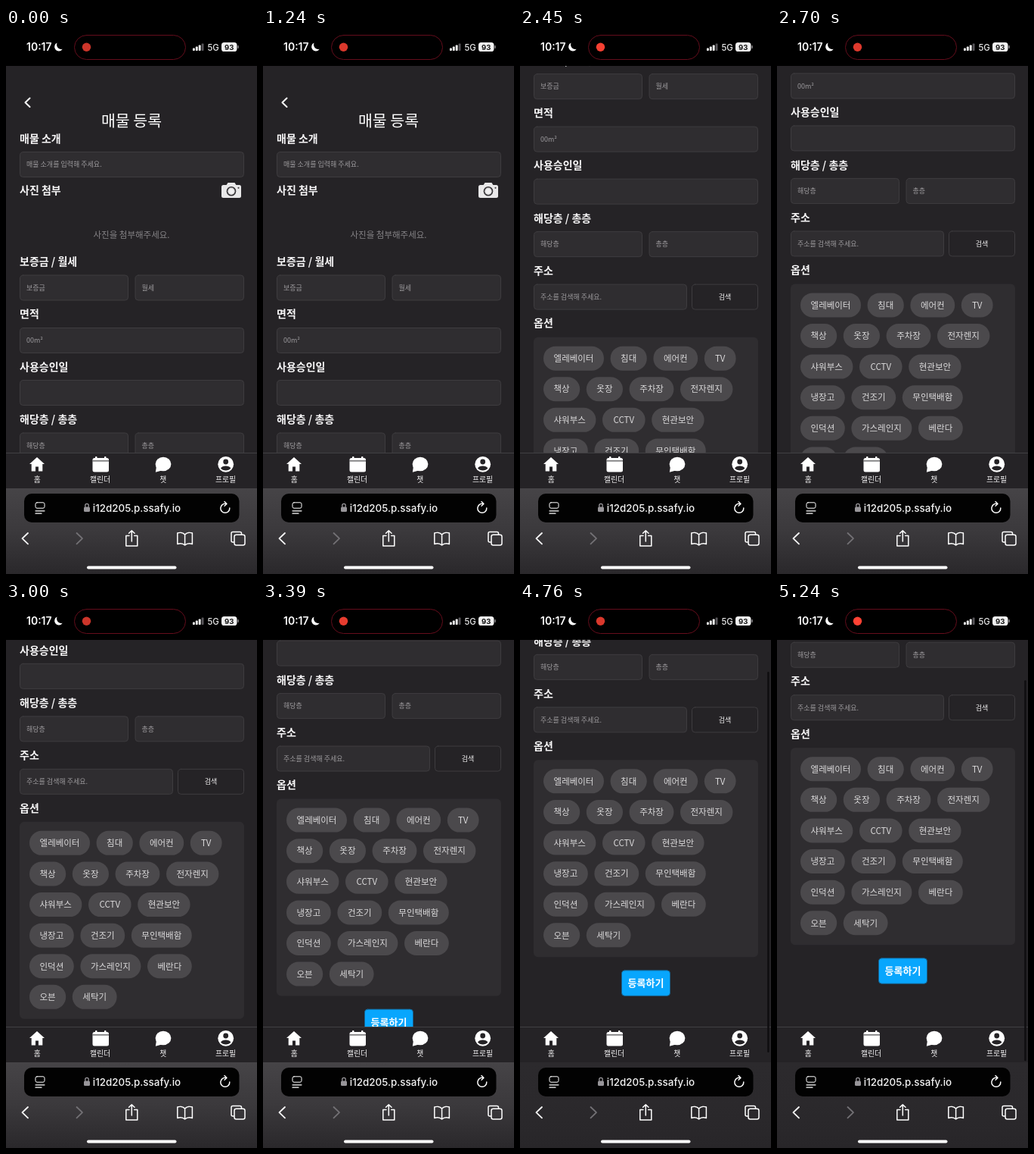
Animation of 332x720 px, one loop 5.27 s. Source, as an HTML page with a canvas:

```html
<!DOCTYPE html>
<html lang="ko">
<head>
<meta charset="utf-8">
<style>
  html, body { margin: 0; width: 100%; height: 100%; overflow: hidden; background: #000; }
  canvas { display: block; width: 332px; height: 720px; }
</style>
</head>
<body>
<canvas id="stage"></canvas>
<script>
const W = 332, H = 720, LOOP = 5270;
const KOREAN = '"Noto Sans CJK KR", "Noto Sans CJK", sans-serif';
const LATIN = 'Inter, sans-serif';
const BG = '#252326', FIELD = '#2f2d30', EDGE = '#3e3c3f', CHIP = '#4b494c', HINT = '#9c9a9d', WHITE = '#fff';

const canvas = document.getElementById('stage');
const c = canvas.getContext('2d');
const scale = window.devicePixelRatio || 1;
canvas.width = W * scale;
canvas.height = H * scale;

// ---- drawing helpers ----
function text(str, x, cy, size, color, { weight = 500, align = 'left', font = KOREAN } = {}) {
  c.font = `${weight} ${size}px ${font}`;
  c.textAlign = align;
  c.fillStyle = color;
  c.fillText(str, x, cy + size * 0.37);
}

function box(x, y, w, h, r, fill, stroke) {
  c.beginPath();
  c.roundRect(x, y, w, h, r);
  if (fill) { c.fillStyle = fill; c.fill(); }
  if (stroke) { c.strokeStyle = stroke; c.lineWidth = 1; c.stroke(); }
}

function disc(x, y, r, color) {
  c.beginPath();
  c.arc(x, y, r, 0, Math.PI * 2);
  c.fillStyle = color;
  c.fill();
}

function shape(d, color) {
  c.fillStyle = color;
  c.fill(new Path2D(d));
}

function line(d, color, width = 1.6) {
  c.strokeStyle = color;
  c.lineWidth = width;
  c.lineCap = c.lineJoin = 'round';
  c.stroke(new Path2D(d));
}

const clamp01 = v => Math.min(1, Math.max(0, v));

// ---- motion ----
const DRAG = [[1540, 0, 0], [2060, 120.5, 0.3], [2300, 201, 0.496]];
const PAGE_DRAG = [[4300, 420, 0], [4600, 455, 0.073]];
const DECAY = 0.0021, LIST_END = 420;

// Cubic through [time, position, velocity] knots.
function glide(knots, t) {
  const i = knots.findIndex((k, n) => n > 0 && t <= k[0]);
  const [t0, p0, v0] = knots[i - 1], [t1, p1, v1] = knots[i];
  const d = t1 - t0, u = (t - t0) / d, w = 1 - u;
  return w * w * ((1 + 2 * u) * p0 + u * d * v0) + u * u * ((3 - 2 * u) * p1 - w * d * v1);
}

function scrollAt(t) {
  if (t < 1540) return 0;
  if (t < 2300) return glide(DRAG, t);
  if (t < 4300) return Math.min(LIST_END, 437.3 - 172.3 * Math.exp(-DECAY * (t - 2450)));
  if (t < 4600) return glide(PAGE_DRAG, t);
  return 490 - 25.4 * Math.exp(-DECAY * (t - 4760));
}

// ---- scrolling form ----
const LABELS = [['매물 소개', 146], ['사진 첨부', 214], ['보증금 / 월세', 308], ['면적', 377],
  ['사용승인일', 446.5], ['해당층 / 총층', 516], ['주소', 585], ['옵션', 654.5]];
const FIELDS = [['매물 소개를 입력해 주세요.', 18, 163, 297], ['보증금', 18, 325.5, 144], ['월세', 170.5, 325.5, 144.5],
  ['00m²', 18, 395, 297], ['', 18, 464, 297], ['해당층', 18, 533.5, 144], ['총층', 170.5, 533.5, 144.5],
  ['주소를 검색해 주세요.', 18, 603, 203]];
const OPTIONS = ['엘레베이터 침대 에어컨 TV', '책상 옷장 주차장 전자렌지', '샤워부스 CCTV 현관보안',
  '냉장고 건조기 무인택배함', '인덕션 가스레인지 베란다', '오븐 세탁기'];

function drawCamera(x, y) {
  c.save();
  c.translate(x, y);
  shape('M-7 -6 L-4.5 -10 H4.5 L7 -6 Z', '#e9e8e9');
  box(-13, -7, 26, 17, 2.5, '#e9e8e9');
  disc(0, 1.3, 6.3, '#343235');
  disc(0, 1.3, 4.7, '#dcdbdc');
  disc(0, 1.3, 3.2, '#f1f0f1');
  disc(9.5, -3.2, 1.1, '#454346');
  c.restore();
}

function drawOptions() {
  box(18, 673, 297, 260, 6, FIELD);
  OPTIONS.forEach((row, r) => {
    const cy = 701 + r * 40.6;
    let x = 31;
    for (const name of row.split(' ')) {
      const w = name.length * (/[A-Z]/.test(name) ? 7.4 : 10.6) + 27;
      box(x, cy - 16, w, 32, 16, CHIP);
      text(name, x + w / 2, cy, 11.5, '#dad9da', { align: 'center' });
      x += w + 8.6;
    }
  });
}

function drawForm(scroll) {
  c.save();
  c.beginPath();
  c.rect(0, 50, W, 510);
  c.clip();
  c.translate(0, -scroll);
  line('M31.5 92.5 L25.5 98.3 L31.5 104', WHITE, 2);
  text('매물 등록', 166, 122, 20.5, WHITE, { align: 'center' });
  for (const [label, y] of LABELS) text(label, 18, y, 14, '#f7f6f7', { weight: 700 });
  for (const [hint, x, y, w] of FIELDS) {
    box(x + 0.5, y + 0.5, w - 1, 33, 4, FIELD, EDGE);
    text(hint, x + 9, y + 17, 9, HINT);
  }
  drawCamera(298, 214);
  text('사진을 첨부해주세요.', 166, 273, 11.5, '#858386', { align: 'center' });
  box(227.5, 603.5, 87, 33, 4, BG, EDGE);
  text('검색', 271, 620, 9, '#efeeef', { align: 'center' });
  drawOptions();
  box(134.5, 950.5, 64, 33.5, 4, '#08a6fd', '#15628f');
  text('등록하기', 166.5, 967.3, 13, WHITE, { weight: 700, align: 'center' });
  c.restore();
}

// ---- fixed bars ----
function drawStatusBar(t) {
  c.fillStyle = '#000';
  c.fillRect(0, 0, W, 50);
  text('10:17', 27, 25, 14, WHITE, { weight: 600, font: LATIN });
  shape('M67.6 19.6 A5.7 5.7 0 1 0 74.7 27.8 A6 6 0 0 1 67.6 19.6 Z', WHITE);
  box(90.5, 9.5, 147, 32, 16, '#000', '#650d1c');
  const glow = 0.9 - 0.1 * Math.cos(t / 1500 * Math.PI * 2);
  disc(106.5, 25.3, 5.7, `rgb(${255 * glow}, ${66 * glow}, ${52 * glow})`);
  for (let i = 0; i < 4; i++) {
    const h = 3.5 + i * 2;
    box(247 + i * 3.9, 30 - h, 2.8, h, 0.8, i < 3 ? WHITE : '#58565a');
  }
  text('5G', 266.5, 25.3, 11.4, '#e8e8e8', { font: LATIN });
  box(285, 19, 20.5, 12, 3.6, '#f2f2f2');
  box(306.3, 23, 1.5, 4, 0.7, '#8b898c');
  text('93', 295.2, 25.1, 9.6, '#161616', { weight: 700, align: 'center', font: LATIN });
}

function drawTabs() {
  c.fillStyle = BG;
  c.fillRect(0, 560, W, 47);
  c.fillStyle = '#414043';
  c.fillRect(0, 560, W, 1);
  shape('M41 566 L51 575 H48.3 V584.5 H43 V578.5 H39 V584.5 H33.7 V575 H31 Z', WHITE);
  box(114.5, 567, 21.5, 18.5, 2.5, WHITE);
  box(118, 565, 2.5, 4, 1, WHITE);
  box(130, 565, 2.5, 4, 1, WHITE);
  c.fillStyle = BG;
  c.fillRect(114.5, 570.4, 21.5, 1);
  c.beginPath();
  c.ellipse(208, 575, 10.4, 9.2, 0, 0, Math.PI * 2);
  c.fillStyle = WHITE;
  c.fill();
  shape('M199 578 L197.8 585.8 L206 583.5 Z', WHITE);
  disc(290.7, 575.3, 10.4, WHITE);
  disc(290.7, 572, 3.4, BG);
  shape('M284 580.4 C286 576.4 295.4 576.4 297.4 580.4 C294.5 584.4 286.9 584.4 284 580.4 Z', BG);
  [['홈', 41.3], ['캘린더', 124.6], ['챗', 207.8], ['프로필', 290.6]].forEach(([name, x]) =>
    text(name, x, 595.5, 9.8, '#f3f2f3', { align: 'center' }));
}

function drawBrowserBar(scroll) {
  // The translucent bar darkens as the page slides beneath it.
  const tint = clamp01((scroll - LIST_END) / 40);
  const grey = (from, to) => {
    const v = from + (to - from) * tint;
    return `rgb(${v}, ${v - 2}, ${v + 1})`;
  };
  const shade = c.createLinearGradient(0, 607, 0, H);
  shade.addColorStop(0, grey(70, 44));
  shade.addColorStop(0.5, grey(59, 43));
  shade.addColorStop(1, grey(42, 40));
  c.fillStyle = shade;
  c.fillRect(0, 607, W, H - 607);
  box(24, 614, 284.5, 38, 10, '#020202');

  box(39, 625.8, 12, 7.4, 2, null, WHITE);
  line('M39 636.8 H51 M39 640.2 H47', WHITE, 1.2);
  box(103, 631.5, 8, 6.5, 1.5, '#98969a');
  line('M104.8 631.5 V629.5 A2.2 2.2 0 0 1 109.2 629.5 V631.5', '#98969a', 1.3);
  text('i12d205.p.ssafy.io', 173, 633, 13.4, '#f5f5f5', { align: 'center', font: LATIN });
  line('M295.8 633 A6 6 0 1 1 290.4 627.4', WHITE, 1.5);
  line('M289 624.6 L292 627.4 L289 630.2', WHITE, 1.4);

  line('M29 666 L21.5 673.2 L29 680.4', WHITE, 1.8);
  line('M93.5 666 L101 673.2 L93.5 680.4', '#737175', 1.8);
  line('M163 669.5 H158.8 V683 H173.8 V669.5 H169.6 M166.3 677 V662.8 M162.6 666.3 L166.3 662.7 L170 666.3', WHITE, 1.5);
  line('M236.6 668 C234 665 229.5 665 226.8 666 V680.5 C230 679.3 234 679.5 236.6 682 C239.2 679.5 243.2 679.3 246.4 680.5 V666 C243.7 665 239.2 665 236.6 668 V681.5', WHITE, 1.5);
  line('M301.5 678 H300 Q298 678 298 676 V666.5 Q298 664.5 300 664.5 H309.5 Q311.5 664.5 311.5 666.5 V668', WHITE, 1.5);
  c.beginPath();
  c.roundRect(302, 668.3, 14, 13.7, 2.5);
  c.stroke();
  box(107, 709.5, 118.5, 4, 2, WHITE);
}

function drawScrollbar(t, scroll) {
  const fade = clamp01((t - 4320) / 120);
  if (!fade) return;
  c.save();
  c.beginPath();
  c.rect(0, 50, W, 557);
  c.clip();
  c.globalAlpha = fade;
  box(327.2, 92 + (scroll - 464.6) * 0.69, 2.4, 502, 1.2, '#0e0d0f');
  c.restore();
}

function frame() {
  const t = performance.now() % LOOP;
  const scroll = scrollAt(t);
  c.setTransform(scale, 0, 0, scale, 0, 0);
  c.fillStyle = BG;
  c.fillRect(0, 0, W, H);
  drawForm(scroll);
  drawStatusBar(t);
  drawTabs();
  drawBrowserBar(scroll);
  drawScrollbar(t, scroll);
  requestAnimationFrame(frame);
}
frame();
</script>
</body>
</html>
```
